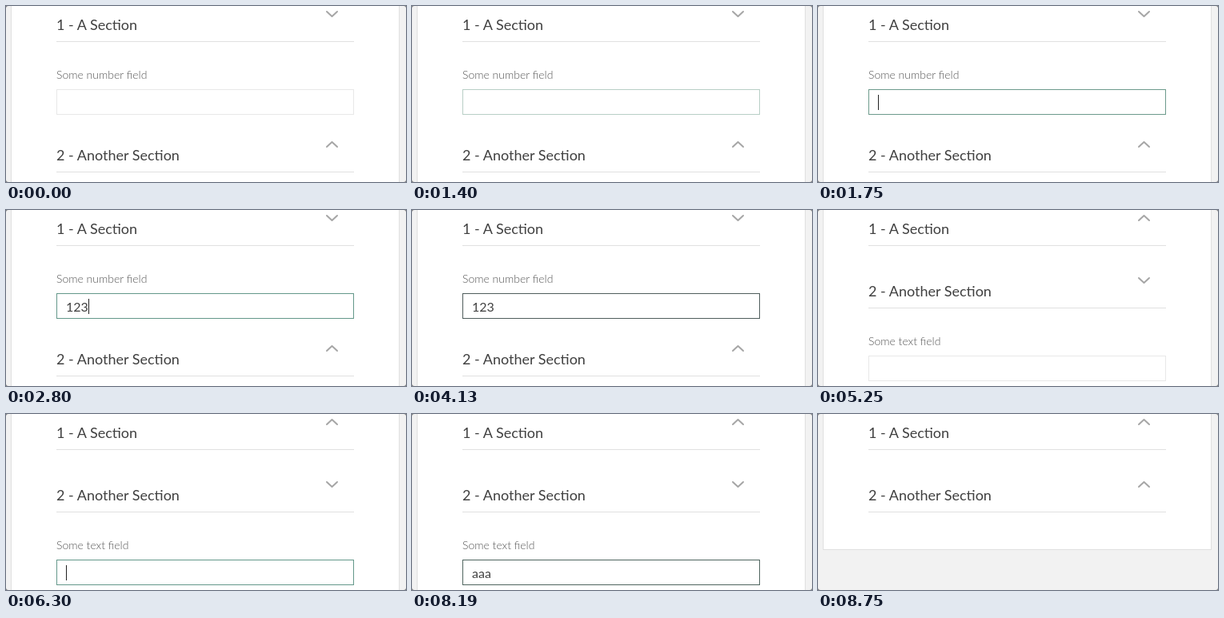
Recreate the animation shown at these times as an HTML page. Size 500 by 220 pixels, loop 9730 ms.

```html
<!DOCTYPE html>
<html lang="en">
<head>
<meta charset="utf-8">
<title>Accordion form</title>
<style>
  html, body { margin: 0; width: 100%; height: 100%; overflow: hidden; background: #777; }
  svg { display: block; width: 500px; height: 220px; border-radius: 3px; background: #f2f2f2; }
  text { font-family: Lato, "Open Sans", sans-serif; fill: #404040; white-space: pre; }
  .title { font-size: 18px; }
  .label { font-size: 14px; font-weight: 300; fill: #555; }
  .value { font-size: 16px; }
  .line { fill: #e0e0e0; }
  .box { fill: #fff; }
  .arrow { fill: none; stroke: #a6a6a6; stroke-width: 2; stroke-linecap: round; stroke-linejoin: round; }
  .caret { fill: #222; }
</style>
</head>
<body>
<svg viewBox="0 0 500 220">
  <rect id="card" x="6.5" y="-9.5" width="485" fill="#fff" stroke="#e0e0e0"/>
</svg>
<script>
const LOOP = 9730;
const IDLE = '#e8e8e8';
const svg = document.querySelector('svg');
const card = document.getElementById('card');

// Each timeline is a list of [start, value]; values hold until the next start.
const sections = [
  {
    title: '1 - A Section', label: 'Some number field', advance: 9.28,
    open: [[0, true], [4340, false]],
    border: [[0, IDLE], [1400, '#b8cfc6'], [1470, '#8fb5a8'], [1680, '#7ea698'],
      [1750, '#6d9b8c'], [1820, '#64988a'], [3500, '#4f5d5c'], [4200, '#8a9493'], [4270, '#c4c9c8']],
    text: [[0, ''], [2380, '1'], [2590, '12'], [2800, '123']],
    caret: [[0, false], [1680, true], [2170, false], [2380, true], [3290, false],
      [3850, true], [4130, false]]
  },
  {
    title: '2 - Another Section', label: 'Some text field', advance: 7.93,
    open: [[0, false], [5250, true], [8750, false]],
    border: [[0, IDLE], [5950, '#b8cfc6'], [6020, '#8fb5a8'], [6160, '#7ea698'],
      [6230, '#6d9b8c'], [6300, '#64988a'], [8120, '#56786e'], [8190, '#4f655f'], [8680, '#8a9493']],
    text: [[0, ''], [6720, 'a'], [7000, 'aa'], [7350, 'aaa']],
    caret: [[0, false], [6160, true], [7910, false], [8400, true], [8610, false]]
  }
];

const at = (line, t) => line.findLast(([start]) => start <= t)[1];

function add(parent, tag, attrs, text = '') {
  const el = document.createElementNS('http://www.w3.org/2000/svg', tag);
  for (const name in attrs) el.setAttribute(name, attrs[name]);
  el.textContent = text;
  return parent.appendChild(el);
}

for (const s of sections) {
  s.group = add(svg, 'g', {});
  add(s.group, 'text', { class: 'title', x: 63, y: 30 }, s.title);
  add(s.group, 'rect', { class: 'line', x: 63, y: 44, width: 372, height: 1 });
  s.arrow = add(s.group, 'path', { class: 'arrow' });
  s.body = add(s.group, 'g', {});
  add(s.body, 'text', { class: 'label', x: 63, y: 91 }, s.label);
  s.box = add(s.body, 'rect', { class: 'box', x: 63.5, y: 104.5, width: 371, height: 31 });
  s.value = add(s.body, 'text', { class: 'value', x: 75, y: 127 });
  s.bar = add(s.body, 'rect', { class: 'caret', y: 111, width: 1, height: 19 });
}

function draw(now) {
  const t = now % LOOP;
  let top = 0;
  for (const s of sections) {
    const open = at(s.open, t);
    const text = at(s.text, t);
    s.group.setAttribute('transform', `translate(0 ${top})`);
    s.arrow.setAttribute('d', open ? 'M401 7l6.5 6 6.5-6' : 'M401 13l6.5-6 6.5 6');
    s.body.setAttribute('visibility', open ? 'visible' : 'hidden');
    s.box.setAttribute('stroke', at(s.border, t));
    s.value.textContent = text;
    s.bar.setAttribute('x', Math.round(75 + text.length * s.advance));
    s.bar.setAttribute('opacity', at(s.caret, t) ? 1 : 0);
    top += open ? 163 : 78;
  }
  card.setAttribute('height', top + 23);
  requestAnimationFrame(draw);
}
draw(0);
</script>
</body>
</html>
```
